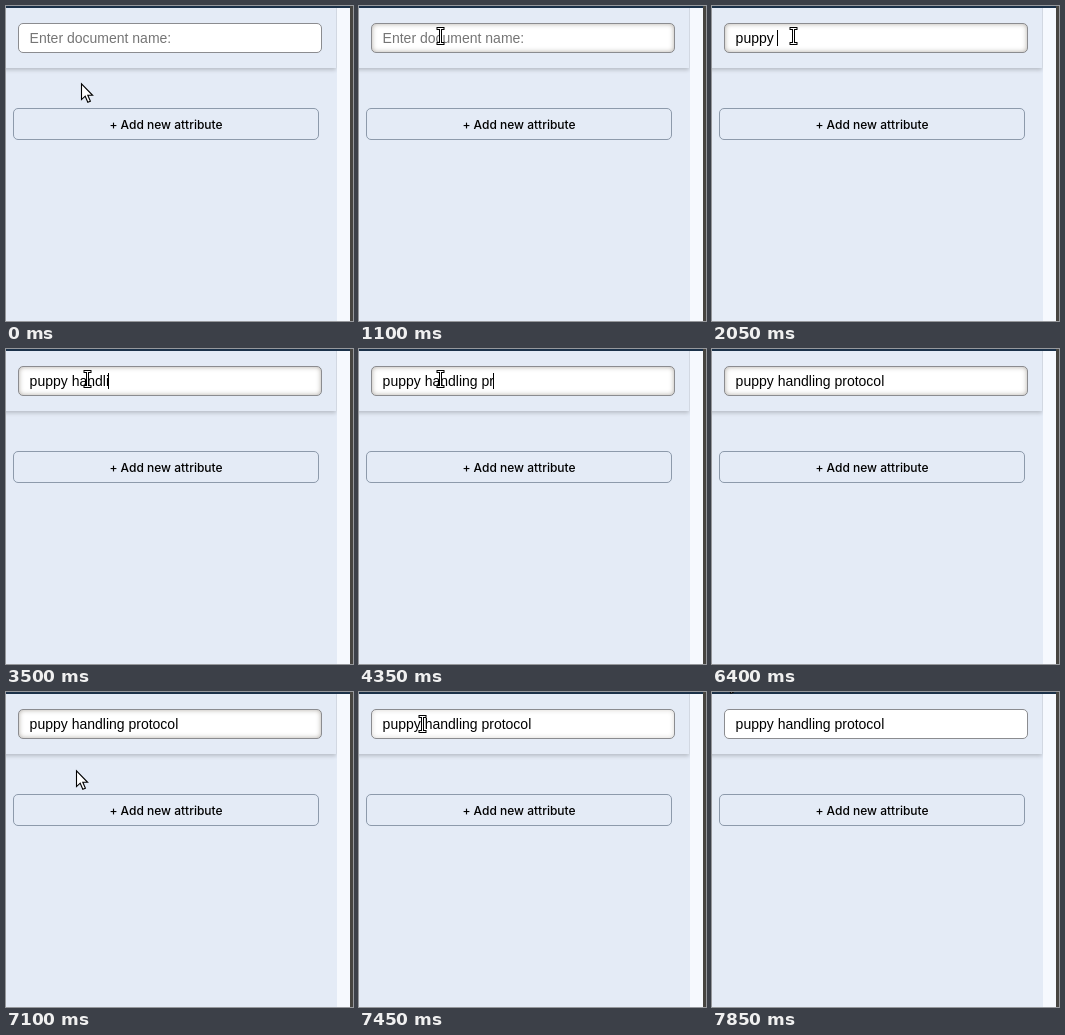
Animation, 347 px wide and 315 px high, one loop 8.05 s. Source, as an HTML page:

```html
<!DOCTYPE html>
<html lang="en">
<head>
<meta charset="utf-8">
<title>Document name</title>
<style>
  html, body { margin: 0; width: 100%; height: 100%; overflow: hidden; }
  body { position: relative; background: #e4ebf6; }
  div, span, svg { position: absolute; box-sizing: border-box; }
  #gutter { left: 331px; top: 0; width: 13px; height: 315px; background: #f6f9fe; }
  #edge { left: 344px; top: 0; width: 3px; height: 315px; background: #464440; }
  #clip { left: 0; top: 2px; width: 331px; height: 80px; overflow: hidden; }
  #header { left: -10px; top: -10px; width: 340px; height: 70px; background: #e4ebf6;
    box-shadow: 0 2px 4px rgba(0, 0, 0, .2); }
  #bar { left: 0; top: 0; width: 344px; height: 2px; background: #1b3149; }
  #field { left: 12px; top: 17px; width: 304px; height: 30px; background: #fff;
    border: 1px solid #8b8c90; border-radius: 5px; }
  #glow { inset: 0; border-radius: 4px; box-shadow: inset 0 0 5px rgba(60, 50, 35, .4); }
  #text { left: 23.6px; top: 24px; white-space: pre;
    font: 14px/16px "Liberation Sans", Arial, sans-serif; }
  #caret { top: 24px; width: 1px; height: 16px; background: #000; }
  #button { left: 7px; top: 102px; width: 306px; height: 32px; text-align: center;
    border: 1px solid #8d9aab; border-radius: 5px; color: #000;
    font: 500 12px/31px Inter, sans-serif; }
  #cursor { left: 0; top: 0; width: 347px; height: 315px; }
</style>
</head>
<body>
<div id="gutter"></div>
<div id="clip"><div id="header"></div></div>
<div id="bar"></div>
<div id="edge"></div>
<div id="field"><div id="glow"></div></div>
<span id="text"></span>
<div id="caret"></div>
<div id="button">+ Add new attribute</div>
<svg id="cursor">
  <path id="arrow" d="M.5 .9V16.6L4.2 13.2L6.8 19.3L9.4 18.2L6.8 12.3H11.6Z"
    fill="#fff" stroke="#000" stroke-width="1.1"/>
  <g id="beam" fill="none">
    <path d="M-3.5 -7.5H4.5M.5 -7.5V7.5M-3.5 7.5H4.5" stroke="#000" stroke-width="3"/>
    <path d="M-2.5 -7.5H3.5M.5 -7.5V7.5M-2.5 7.5H3.5" stroke="#fff" stroke-width="1"/>
  </g>
</svg>
<script>
const LOOP = 8050, TICK = 50, FOCUS = 500, BLUR = 7400, BLINK = 600;

// Each word is typed at its own steady pace
const WORDS = [
  { word: 'puppy ', start: 1200, pace: 170 },
  { word: 'handling ', start: 2700, pace: 143 },
  { word: 'protocol', start: 4050, pace: 178 }
];
const KEYS = WORDS.flatMap(({ word, start, pace }) =>
  [...word].map((char, i) => ({ char, time: start + i * pace })));

// Curved pointer moves, each beginning where the last one ended
const HOME = [75, 77];
const MOVES = [
  { start: 0, end: 250, via: [70, 65], to: [81, 30] },
  { start: 6100, end: 6400, via: [60, 24], to: [8, -23] },
  { start: 6400, end: 6950, via: [-15, 60], to: [62, 98] },
  { start: 6950, end: 7850, via: [96, 37], to: [12, -18] }
];

const $ = id => document.getElementById(id);
const [text, caret, glow, arrow, beam] = ['text', 'caret', 'glow', 'arrow', 'beam'].map($);

const bezier = (a, b, c, k) => a * (1 - k) ** 2 + 2 * b * k * (1 - k) + c * k * k;

function pointerAt(t) {
  return MOVES.reduce((from, { start, end, via, to }) => {
    const k = Math.min(1, Math.max(0, (t - start) / (end - start)));
    return from.map((v, axis) => bezier(v, via[axis], to[axis], k));
  }, HOME).map(Math.round);
}

function drawField(t) {
  const typed = KEYS.filter(key => key.time <= t);
  const filled = typed.length > 0;
  text.textContent = filled ? typed.map(key => key.char).join('') : 'Enter document name:';
  text.style.color = filled ? '#000' : '#757575';

  const lastKey = filled ? typed.at(-1).time : FOCUS;
  const focused = t >= FOCUS && t < BLUR;
  const lit = focused && Math.floor((t - lastKey) / BLINK) % 2 === 0;
  const width = filled ? text.getBoundingClientRect().width : 0;
  caret.style.left = Math.floor(23 + width) + 'px';
  caret.style.visibility = lit ? 'visible' : 'hidden';

  const level = (t >= FOCUS) + (t >= FOCUS + 100) - (t >= BLUR) - (t >= BLUR + 100);
  glow.style.opacity = level / 2;
}

function drawPointer(t) {
  const [x, y] = pointerAt(t);
  const overField = x > 12 && x < 316 && y > 17 && y < 47;
  arrow.style.display = overField ? 'none' : '';
  beam.style.display = overField ? '' : 'none';
  for (const shape of [arrow, beam]) shape.setAttribute('transform', `translate(${x} ${y})`);
}

const start = performance.now();
function frame() {
  const t = Math.floor((performance.now() - start) % LOOP / TICK) * TICK;
  drawField(t);
  drawPointer(t);
  requestAnimationFrame(frame);
}
frame();
</script>
</body>
</html>
```
